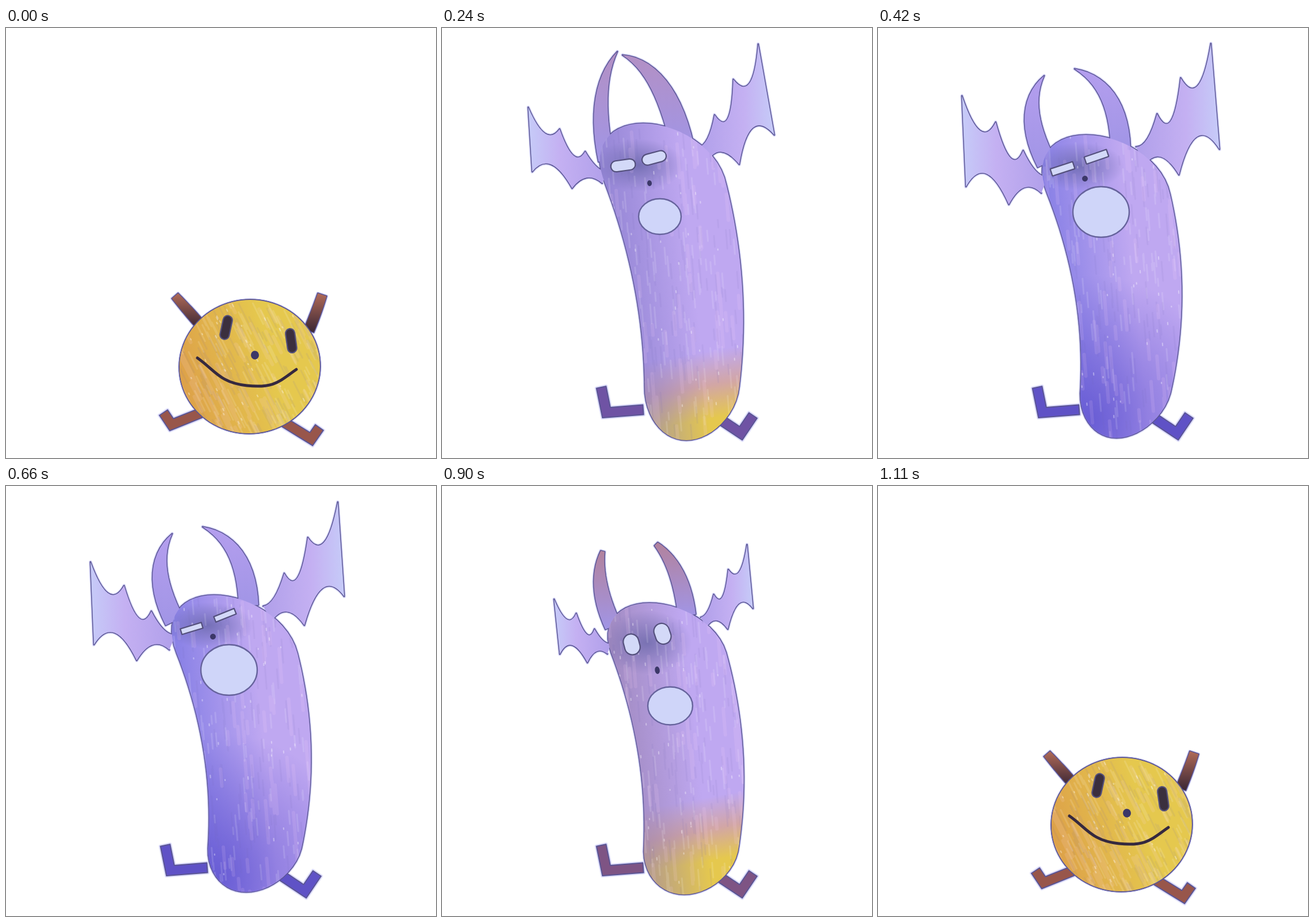
An HTML page for the animation above (1140 ms loop, 748 by 748 pixels).

```html
<!DOCTYPE html>
<html lang="en">
<head>
<meta charset="utf-8">
<title>Smiley turning into a winged monster</title>
<style>
html, body { margin: 0; width: 100%; height: 100%; overflow: hidden; background: #fff; }
svg { display: block; width: 100%; height: 100%; }
path, rect { stroke-linejoin: round; stroke-linecap: round; }
</style>
</head>
<body>
<svg id="stage" viewBox="0 0 748 748">
  <defs>
    <linearGradient id="skin" gradientUnits="userSpaceOnUse" x1="390" x2="410">
      <stop offset="0" stop-color="#bfa8f1"/>
      <stop offset=".5" stop-color="#d2a6a6"/>
      <stop offset="1" stop-color="#e5c84e"/>
    </linearGradient>
    <linearGradient id="side" x1="0" y1=".6" x2=".65" y2=".45">
      <stop offset="0" stop-opacity=".9"/><stop offset="1" stop-opacity="0"/>
    </linearGradient>
    <linearGradient id="limb" x1="0" y1="0" x2="0" y2="1">
      <stop offset="0"/><stop offset="1"/>
    </linearGradient>
    <linearGradient id="wingL">
      <stop offset="0" stop-color="#c6cbf8"/><stop offset=".4" stop-color="#c4b0f2"/><stop offset="1" stop-color="#b09fea"/>
    </linearGradient>
    <linearGradient id="wingR" x1="1" x2="0" href="#wingL"/>
    <radialGradient id="base" gradientUnits="userSpaceOnUse" cx="370" cy="680" r="250">
      <stop offset="0" stop-color="#5549cc"/><stop offset="1" stop-color="#5549cc" stop-opacity="0"/>
    </radialGradient>
    <radialGradient id="soft">
      <stop offset="0" stop-color="#6664a6"/><stop offset="1" stop-color="#6664a6" stop-opacity="0"/>
    </radialGradient>
    <clipPath id="inside"><path id="clip"/></clipPath>
  </defs>
</svg>
<script>
const STEP = 30, LOOP = 1140;
const INK = '#5a5594';

// body: top x y, bottom x y, bend, half widths and cap heights at top and bottom
// horn: root, control, tip, half widths at root and tip; wing: root, upper tip, lower tip
// eyes: x y turn each, width, height; mouth: x y, half width, rise, drop, tilt, roundness
// nose: x y rx ry; fade: where purple ends and yellow starts; cold: 0 smiley, 1 monster
const ball = {
  body: [425, 473, 423, 705, 0, 122, 122, 116, 116],
  hornL: [338, 516, 316, 491, 294, 466, 9, 7], hornR: [527, 526, 540, 495, 550, 464, 9, 8],
  wingL: [340, 570, 340, 570, 340, 570], wingR: [510, 560, 510, 560, 510, 560],
  eyes: [383, 521, 12, 496, 544, -8, 16, 42],
  mouth: [419, 584, 86, -38, 38, 10, 0],
  nose: [433, 569, 7, 7.5], fade: [300, 380], cold: [0]
};
const rising = {
  body: [377, 267, 425, 709, 28, 82, 88, 70, 85],
  hornL: [312, 328, 292, 265, 281, 208, 9, 8], hornR: [427, 292, 420, 220, 395, 164, 11, 10],
  wingL: [308, 335, 274, 306, 280, 314], wingR: [452, 315, 470, 268, 472, 290],
  eyes: [354, 360, -14, 418, 352, -18, 14, 88],
  mouth: [420, 497, 47, 23, 13, -10, 0],
  nose: [408, 450, 4.5, 13], fade: [290, 430], cold: [.34]
};
const winged = {
  body: [350, 166, 425, 717, 40, 112, 76, 100, 90],
  hornL: [286, 230, 260, 107, 305, 41, 14, 0], hornR: [418, 205, 388, 72, 314, 47, 20, 0],
  wingL: [285, 260, 150, 138, 157, 250], wingR: [452, 220, 550, 28, 578, 186],
  eyes: [315, 239, -8, 369, 226, -15, 43, 19],
  mouth: [379, 328, 37, 31, 31, 0, 1],
  nose: [361, 270, 4, 5], fade: [575, 690], cold: [.85]
};
const scream = {
  body: [362, 186, 415, 713, 46, 115, 72, 100, 80],
  hornL: [293, 235, 245, 141, 289, 83, 17, 0], hornR: [422, 208, 418, 100, 342, 71, 17, 0],
  wingL: [291, 272, 146, 118, 153, 276], wingR: [455, 222, 579, 27, 594, 211],
  eyes: [321, 245, -18, 380, 224, -19, 41, 13],
  mouth: [388, 320, 49, 44, 44, 0, 1],
  nose: [360, 262, 5, 5], fade: [780, 880], cold: [1]
};
const scowl = {
  ...scream,
  body: [362, 190, 418, 706, 46, 112, 76, 100, 78],
  wingL: [291, 271, 147, 133, 153, 276], wingR: [453, 222, 577, 28, 588, 191],
  eyes: [323, 248, -17, 381, 225, -22, 38, 10]
};
const sinking = {
  body: [360, 217, 425, 715, 35, 97, 80, 75, 80],
  hornL: [302, 252, 282, 200, 270, 144, 12, 7], hornR: [430, 242, 415, 185, 403, 131, 14, 8],
  wingL: [292, 294, 243, 261, 257, 309], wingR: [455, 252, 484, 176, 494, 235],
  eyes: [337, 303, -13, 386, 289, -16, 16, 63],
  mouth: [406, 445, 29, 22, 22, 0, 1],
  nose: [389, 379, 3.5, 8], fade: [330, 445], cold: [.36]
};

const easeIn = u => u ** 1.4, easeOut = u => 1 - (1 - u) ** 1.4, linear = u => u;
const shake = u => (1 - Math.cos(5 * Math.PI * u)) / 2;
const keys = [
  [0, ball, easeIn], [150, rising, linear], [240, winged, easeOut],
  [420, scream, shake], [840, scowl, linear], [960, sinking, easeOut], [1110, ball, linear]
];

const mix = (a, b, u) => a + (b - a) * u;
const mixAll = (a, b, u) => a.map((v, i) => mix(v, b[i], u));
const clamp = v => Math.min(1, Math.max(0, v));

function poseAt(t) {
  const i = keys.findLastIndex(k => k[0] <= t);
  const [from, a, ease] = keys[i];
  if (i === keys.length - 1) return a;
  const [to, b] = keys[i + 1];
  const u = ease((t - from) / (to - from));
  return Object.fromEntries(Object.keys(a).map(k => [k, mixAll(a[k], b[k], u)]));
}

const at = p => p.map(v => v.toFixed(2)).join(' ');
const polygon = pts => 'M' + pts.map(at).join('L') + 'Z';

// Bent capsule
function bodyPath([tx, ty, bx, by, bend, wTop, wBottom, capTop, capBottom]) {
  const left = [], right = [], n = 48;
  const cap = (d, c) => d < c ? Math.sqrt(1 - (1 - d / c) ** 2) : 1;
  for (let i = 0; i <= n; i++) {
    const u = (1 - Math.cos(Math.PI * i / n)) / 2, tall = by - ty;
    const x = mix(tx, bx, u) + bend * 4 * u * (1 - u);
    const w = mix(wTop, wBottom, u) * cap(u * tall, capTop) * cap((1 - u) * tall, capBottom);
    left.unshift([x - w, ty + u * tall]);
    right.push([x + w, ty + u * tall]);
  }
  return polygon([...right, ...left]);
}

// Band of changing half width along a line
function ribbon(pts, width) {
  const normal = (a, b) => {
    const dx = b[0] - a[0], dy = b[1] - a[1], l = Math.hypot(dx, dy) || 1;
    return [-dy / l, dx / l];
  };
  const one = [], two = [], end = pts.length - 1;
  pts.forEach((p, i) => {
    const a = normal(pts[Math.max(i - 1, 0)], pts[Math.max(i, 1)]);
    const b = normal(pts[Math.min(i, end - 1)], pts[Math.min(i + 1, end)]);
    const m = [a[0] + b[0], a[1] + b[1]];
    const k = 2 * width(i / end) / (m[0] ** 2 + m[1] ** 2);
    one.push([p[0] + m[0] * k, p[1] + m[1] * k]);
    two.unshift([p[0] - m[0] * k, p[1] - m[1] * k]);
  });
  return polygon([...one, ...two]);
}

function hornPath([x0, y0, cx, cy, x1, y1, w0, w1]) {
  const pts = [];
  for (let i = 0; i <= 14; i++) {
    const s = i / 14;
    pts.push([mix(mix(x0, cx, s), mix(cx, x1, s), s), mix(mix(y0, cy, s), mix(cy, y1, s), s)]);
  }
  return ribbon(pts, s => mix(w0, w1, s * s));
}

// Bat wing: points measured along the two tip vectors, with sagging edges between them
const wingEdge = [[.38, -.12, .16], [.7, -.11, .47], [1, 0, .47], [0, 1, 0], [-.21, .68, -.48], [-.095, .15, -.25]];
function wingPath([x, y, tx, ty, bx, by]) {
  const place = (a, b) => [x + a * (tx - x) + b * (bx - x), y + a * (ty - y) + b * (by - y)];
  let last = place(.085, -.12), d = 'M' + at(last);
  for (const [a, b, sag] of wingEdge) {
    const p = place(a, b);
    const mid = [(last[0] + p[0]) / 2 + sag * (bx - tx), (last[1] + p[1]) / 2 + sag * (by - ty)];
    d += `Q${at(mid)} ${at(p)}`;
    last = p;
  }
  return d;
}

function mouthPath([x, y, rx, up, down, tilt, round]) {
  const arc = (side, h) => [
    [x + side * rx, y + side * tilt],
    [x + side * rx * mix(.65, 1, round), y + side * tilt - h * .55],
    [x + side * rx * .55, y - h + side * tilt * .5]];
  const half = h => {
    const l = arc(-1, h), r = arc(1, h);
    return [l, [x, y - h], r];
  };
  const [l, top, r] = half(up), [l2, low, r2] = half(-down);
  return `M${at(l[0])}C${at(l[1])} ${at(l[2])} ${at(top)}C${at(r[2])} ${at(r[1])} ${at(r[0])}`
    + `C${at(r2[1])} ${at(r2[2])} ${at(low)}C${at(l2[2])} ${at(l2[1])} ${at(l[0])}Z`;
}

// Hip, heel and toe of each leg, for the smiley and for the tall body
const legs = [
  [[[338, 670], [350, 664]], [[288, 690], [286, 669]], [[274, 669], [277, 625]]],
  [[[484, 686], [478, 677]], [[531, 715], [520, 705]], [[545, 695], [541, 674]]]
];
const legPath = (leg, u) => ribbon(leg.map(([a, b]) => mixAll(a, b, u)), () => 8.5);

const stage = document.getElementById('stage');
const find = id => document.getElementById(id);
function set(el, attrs) {
  for (const k in attrs) el.setAttribute(k, attrs[k]);
  return el;
}
const add = (tag, attrs) =>
  stage.appendChild(set(document.createElementNS('http://www.w3.org/2000/svg', tag), attrs));
const line = (color, width) => add('path', { fill: 'none', stroke: color, 'stroke-width': width });
const fill = paint => add('path', { fill: paint });
const clipped = { 'clip-path': 'url(#inside)' };

const halo = line('#dcdcfb', 6);
const feet = add('path', { stroke: INK, 'stroke-width': 2 });
const outline = line(INK, 3);
const wings = ['wingL', 'wingR'].map(id => fill(`url(#${id})`));
const horns = ['hornL', 'hornR'].map(() => fill('url(#limb)'));
const edge = line(INK, 3.5);
const layers = ['skin', 'side', 'base'].map(id => fill(`url(#${id})`));
const smudge = add('ellipse', { fill: 'url(#soft)', ...clipped });
// color, width, opacity, count, length
const crayons = [
  ['#fff', 3, .13, 150, 26], ['#7468b0', 3, .09, 150, 30],
  ['#ffd0f0', 6, .12, 80, 45], ['#fff', 2.2, .35, 60, 3]
].map(([color, width, alpha, count, length]) =>
  ({ path: set(line(color, width), { 'stroke-opacity': alpha, ...clipped }), count, length }));
const eyes = [0, 1].map(() => add('rect', { stroke: '#54507c', 'stroke-width': 2.2 }));
const nose = add('ellipse', { fill: '#3c3868' });
const mouth = add('path', { fill: '#cfd5f9' });

function random(seed) {
  let s = seed * 7919 + 17;
  return () => (s = (s * 16807) % 2147483647) / 2147483647;
}

function hatch(rnd, count, length, lean, top) {
  let d = '';
  for (let i = 0; i < count; i++) {
    const l = length * (.4 + rnd());
    d += `M${at([270 + rnd() * 285, mix(top, 715, rnd())])}l${at([lean * l, l])}`;
  }
  return d;
}

const rgb = hex => hex.match(/\w\w/g).map(h => parseInt(h, 16));
const blend = (a, b, u) => `rgb(${mixAll(rgb(a), rgb(b), u).map(Math.round)})`;

function draw(t) {
  const p = poseAt(t);
  const cold = p.cold[0], grown = clamp(cold * 3), chill = cold * cold;
  const body = bodyPath(p.body);
  const wingShapes = [p.wingL, p.wingR].map(wingPath);
  const hornShapes = [p.hornL, p.hornR].map(hornPath);
  const legShapes = legs.map(leg => legPath(leg, grown)).join('');
  const shape = [body, ...wingShapes, ...hornShapes].join('');

  set(halo, { d: shape + legShapes });
  set(feet, { d: legShapes, fill: blend('#98564b', '#5f52c6', chill) });
  set(outline, { d: shape });
  wings.forEach((w, i) => set(w, { d: wingShapes[i] }));
  horns.forEach((h, i) => set(h, { d: hornShapes[i] }));
  set(edge, { d: body, 'stroke-opacity': 1 - grown });
  layers.forEach(l => set(l, { d: body }));
  set(layers[2], { opacity: .7 * clamp((cold - .85) / .15) });
  set(find('clip'), { d: body });

  set(find('skin'), { y1: p.fade[0], y2: p.fade[1] });
  const tint = blend('#dc9c48', '#7673e2', cold);
  for (const stop of find('side').children) set(stop, { 'stop-color': tint });
  const [tip, root] = find('limb').children;
  set(tip, { 'stop-color': blend('#b06a58', '#b49eee', chill) });
  set(root, { 'stop-color': blend('#3a2634', '#a195e6', grown) });

  const rnd = random(t / STEP % 37 + 1);
  for (const c of crayons)
    set(c.path, { d: hatch(rnd, c.count, c.length, mix(.5, .08, grown), p.body[1]) });

  const [x1, y1, , x2, y2, , w, h] = p.eyes;
  set(smudge, { cx: (x1 + x2) / 2, cy: (y1 + y2) / 2 + 6, rx: 78, ry: 34 + h * .6, opacity: .75 * grown });
  const round = clamp((h - 12) / 7) / 2;
  eyes.forEach((eye, i) => {
    const [x, y, turn] = p.eyes.slice(3 * i, 3 * i + 3);
    set(eye, {
      x: x - w / 2, y: y - h / 2, width: w, height: h, rx: Math.min(w, h) * round,
      transform: `rotate(${turn} ${x} ${y})`, fill: blend('#3b2f3e', '#d3d9f8', grown)
    });
  });
  const [nx, ny, nrx, nry] = p.nose;
  set(nose, { cx: nx, cy: ny, rx: nrx, ry: nry, transform: `rotate(-8 ${nx} ${ny})` });
  set(mouth, {
    d: mouthPath(p.mouth), 'stroke-width': mix(5, 2.4, grown),
    stroke: blend('#35293f', '#66639c', grown)
  });
}

let last = -1;
function tick() {
  const t = Math.floor(performance.now() % LOOP / STEP) * STEP;
  if (t !== last) draw(last = t);
  requestAnimationFrame(tick);
}
tick();
</script>
</body>
</html>
```
